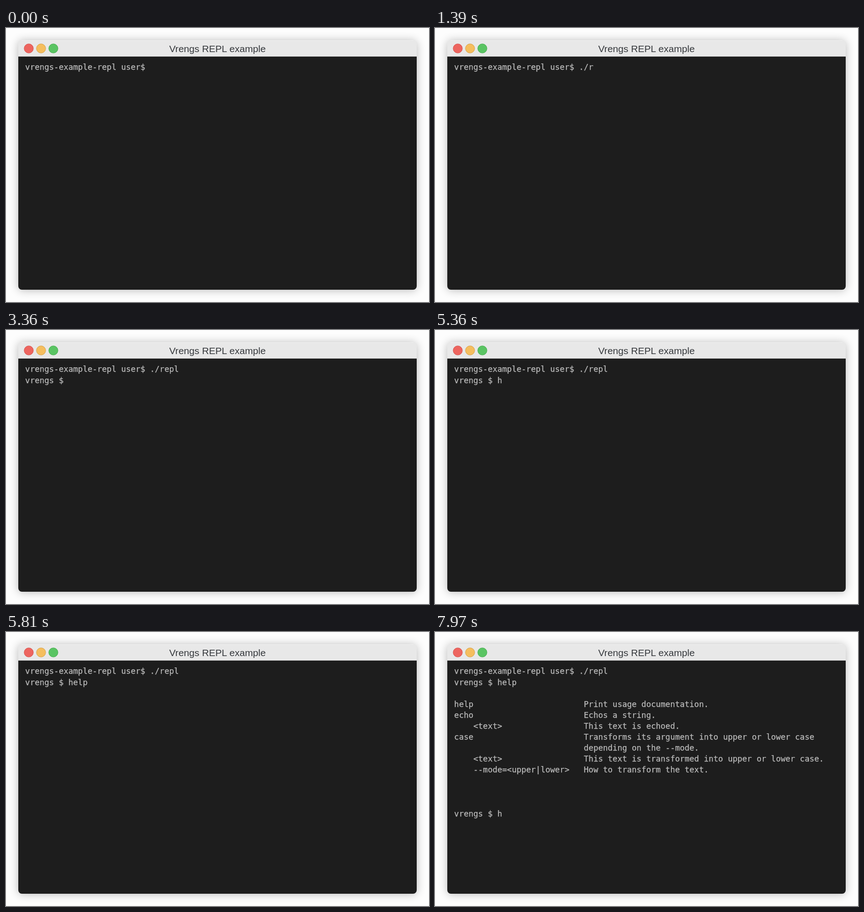
An HTML page for the animation above (8000 ms loop, 929 by 603 pixels).

```html
<!DOCTYPE html>
<html lang="en">
<head>
<meta charset="utf-8">
<title>REPL example</title>
<style>
  html, body { margin: 0; width: 100%; height: 100%; overflow: hidden; background: #fdfdfd; }
  svg { display: block; width: 100%; height: 100%; }
  .title { font: 21.1px "Liberation Sans", Arial, sans-serif; fill: #36393d; text-anchor: middle; }
  .line {
    font: 17.53px "DejaVu Sans Mono", Menlo, monospace;
    fill: #bcbcbc; stroke: #bcbcbc; stroke-width: .25; white-space: pre;
  }
</style>
</head>
<body>
<svg viewBox="0 0 929 603" xmlns="http://www.w3.org/2000/svg">
  <defs>
    <filter id="soft" x="-10%" y="-10%" width="120%" height="120%">
      <feGaussianBlur stdDeviation="10"/>
    </filter>
  </defs>
  <rect width="929" height="603" fill="#fdfdfd"/>
  <rect x="27" y="28" width="875" height="549" rx="8" opacity=".27" filter="url(#soft)"/>
  <path d="M27 62H902V568a8 8 0 0 1 -8 8H35a8 8 0 0 1 -8 -8Z" fill="#1d1d1d"/>
  <path d="M27 63V35a8 8 0 0 1 8-8H894a8 8 0 0 1 8 8V63Z" fill="#e8e8e8"/>
  <path d="M34 27.5H895" stroke="#efefef"/>
  <path d="M27 62.5H902" stroke="#c4c4c4"/>
  <g id="buttons"></g>
  <text class="title" x="464.5" y="52.6">Vrengs REPL example</text>
  <g id="screen"></g>
</svg>
<script>
const LOOP = 8000;
const LEFT = 42.1, BASELINE = 92.4, PITCH = 24.12, ROWS = 14;
const SHELL = "vrengs-example-repl user$ ";
const PROMPT = "vrengs $ ";

const row = (label, info) => label.padEnd(27) + info;
const HELP = [
  "",
  row("help", "Print usage documentation."),
  row("echo", "Echos a string."),
  row("    <text>", "This text is echoed."),
  row("case", "Transforms its argument into upper or lower case"),
  row("", "depending on the --mode."),
  row("    <text>", "This text is transformed into upper or lower case."),
  row("    --mode=<upper|lower>", "How to transform the text."),
  "", "", ""
];

// Each command: when its line appears, its prompt, key press times and output.
const COMMANDS = [
  { start: 0, prompt: SHELL, text: "./repl", keys: [860, 910, 1390, 1550, 1730, 1890], output: [] },
  { start: 3360, prompt: PROMPT, text: "help", keys: [5360, 5490, 5640, 5810], output: HELP },
  { start: 5970, prompt: PROMPT, text: "h", keys: [7970], output: [] }
];

function add(parent, tag, attrs) {
  const el = document.createElementNS("http://www.w3.org/2000/svg", tag);
  for (const name in attrs) el.setAttribute(name, attrs[name]);
  return parent.appendChild(el);
}

const buttons = document.getElementById("buttons");
[["#ed655f", "#d8504b"], ["#f5be5e", "#d8a044"], ["#5ac463", "#44ad4c"]].forEach(([fill, stroke], i) =>
  add(buttons, "circle", { cx: 50 + i * 27, cy: 45, r: 10.1, fill, stroke }));

const screen = document.getElementById("screen");
const rows = Array.from({ length: ROWS }, (_, i) =>
  add(screen, "text", { class: "line", x: LEFT, y: BASELINE + i * PITCH }));

function linesAt(time) {
  const lines = [];
  COMMANDS.forEach(({ start, prompt, text, keys, output }, i) => {
    if (time < start) return;
    const typed = keys.filter(key => time >= key).length;
    lines.push(prompt + text.slice(0, typed));
    const next = COMMANDS[i + 1];
    if (next && time >= next.start) lines.push(...output);
  });
  return lines;
}

function render(time) {
  const lines = linesAt(time);
  rows.forEach((el, i) => {
    const text = lines[i] || "";
    if (el.textContent !== text) el.textContent = text;
  });
}

const origin = performance.now();
function tick() {
  render((performance.now() - origin) % LOOP);
  requestAnimationFrame(tick);
}
tick();
</script>
</body>
</html>
```
